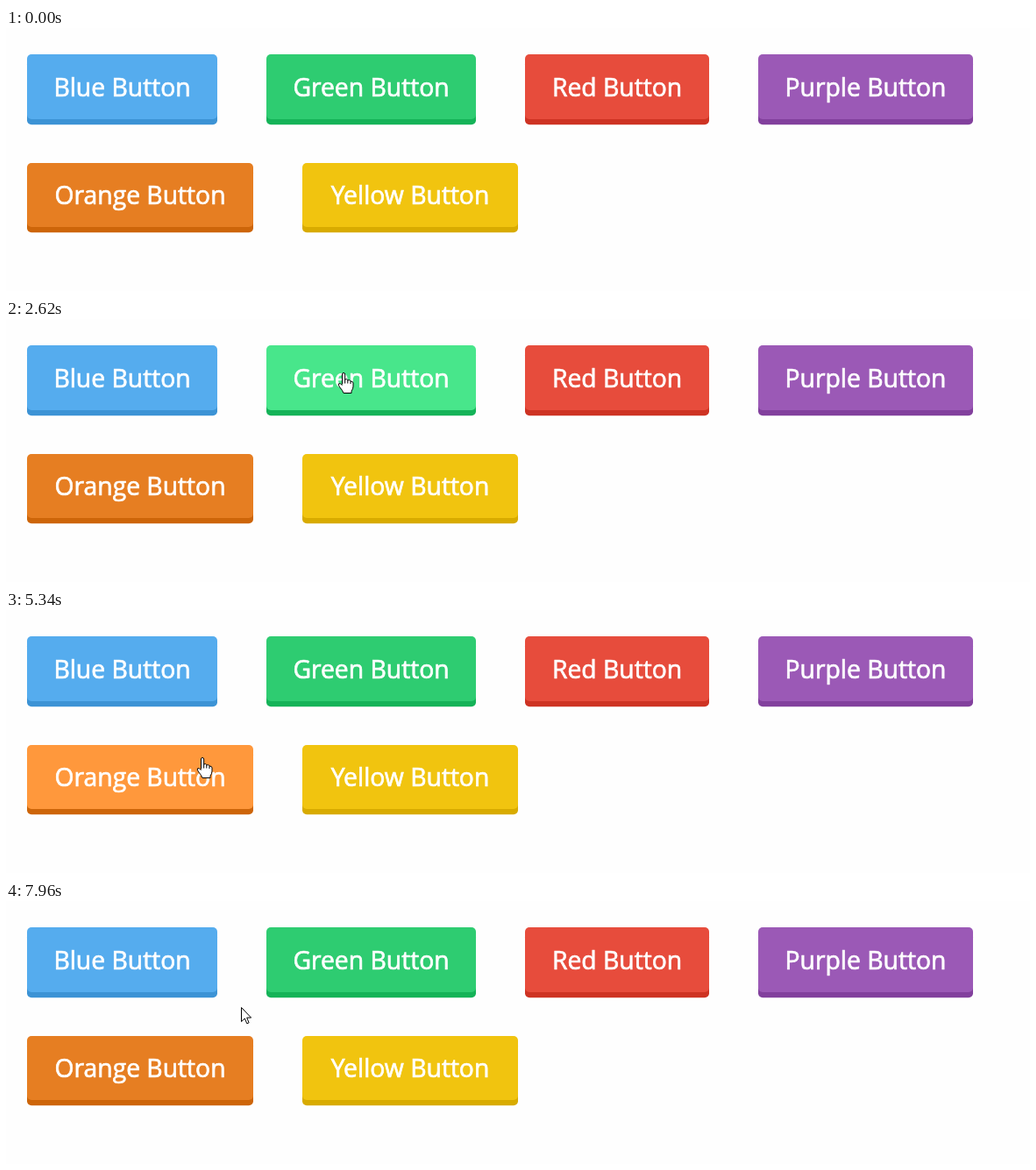
An HTML page that plays this animation: 1168 px wide and 300 px high, repeating every 8000 ms.

```html
<!DOCTYPE html>
<html lang="en">
<head>
<meta charset="utf-8">
<title>Flat buttons</title>
<style>
html, body { margin: 0; width: 100%; height: 100%; overflow: hidden; background: #fefefe; }
svg { display: block; }
text { font: 28.3px "Open Sans", "Noto Sans", sans-serif; fill: #fff; stroke: #fff; stroke-width: .7px; text-anchor: middle; }
#cursor path { fill: #fff; stroke: #000; stroke-linejoin: round; }
</style>
</head>
<body>
<svg width="1168" height="300" viewBox="0 0 1168 300">
  <g id="buttons"></g>
  <g id="cursor">
    <path id="arrow" d="M.5 .5V16.6L4.3 13L6.8 18.8L9.1 17.8L6.7 12.1H11.6Z"/>
    <path id="hand" d="M-1.5 13.5V2Q-1.5 .5 0 .5T1.7 2V8Q3.6 6.9 4.8 8.4V9Q7 8 8 9.6V10.2Q10.8 9.6 11 12V16Q10.8 19 9 21.2V23.5H0Q-1 20.5-4.3 16.8Q-6.7 13.6-5.3 12.7Q-3.8 12-1.5 14.5M1.7 8V12.5M4.8 9V12.5M8 10.2V13"/>
  </g>
</svg>
<script>
const LOOP = 8000, WIDTH = 1168;
const LEFT = 24, TOP = 30, GAP = 56, ROW = 124;
const DEPTH = 6.25, PRESSED_DEPTH = 1.25, SHADE = 25;
const REST = 170; // pause between releasing a button and moving on
const byId = id => document.getElementById(id);

function add(parent, tag, attrs = {}) {
  const node = document.createElementNS('http://www.w3.org/2000/svg', tag);
  for (const key in attrs) node.setAttribute(key, attrs[key]);
  return parent.appendChild(node);
}

function shade(hex, amount) {
  const channels = hex.match(/\w\w/g).map(c => parseInt(c, 16) + amount);
  return `rgb(${channels.map(c => Math.max(0, Math.min(255, c)))})`;
}

// Buttons flow from left to right and wrap at the edge of the stage.
let nextX = LEFT, row = 0;
const buttons = [
  ['Blue', 217, '#55acee'],
  ['Green', 239, '#2ecc71'],
  ['Red', 210, '#e74c3c'],
  ['Purple', 245, '#9b59b6'],
  ['Orange', 258, '#e67e22'],
  ['Yellow', 246, '#f1c40f']
].map(([name, width, color]) => {
  if (nextX + width > WIDTH) {
    nextX = LEFT;
    row++;
  }
  const box = { x: nextX, y: TOP + row * ROW, width, height: 74 - row, rx: 5 };
  nextX += width + GAP;
  const group = add(byId('buttons'), 'g');
  const edge = add(group, 'rect', { ...box, fill: shade(color, -SHADE) });
  const face = add(group, 'rect', box);
  const label = add(group, 'text', { x: box.x + width / 2, y: box.y + box.height - 26 });
  label.textContent = name + ' Button';
  return { box, color, group, edge, face };
});

// Cursor stops: x, y, departure, arrival, press
const entry = [1140, 325];
const stops = [
  [715, 211, 150, 450],
  [165, 66, 680, 1370, 1450],
  [385, 61, 1690, 2320, 2470],
  [695, 71, 2790, 3100, 3170],
  [980, 72, 3950, 4330, 4410],
  [224, 168, 5040, 5340, 5640],
  [428, 176, 6270, 6870, 7040],
  [268, 121, 7730, 7960]
];

function cursorAt(t) {
  let [x, y] = entry;
  for (const [toX, toY, depart, arrive] of stops) {
    const p = Math.max(0, Math.min(1, (t - depart) / (arrive - depart)));
    const ease = Math.sin(p * Math.PI / 2);
    x += (toX - x) * ease;
    y += (toY - y) * ease;
  }
  return [Math.round(x), Math.round(y)];
}

function isPressed(t) {
  return stops.some(([, , , , press], i) => press && t >= press && t < stops[i + 1][2] - REST);
}

function draw(t) {
  const [x, y] = cursorAt(t);
  let over = false;
  for (const { box, color, group, edge, face } of buttons) {
    const hit = x >= box.x && x < box.x + box.width && y >= box.y && y < box.y + box.height;
    const depth = hit && isPressed(t) ? PRESSED_DEPTH : DEPTH;
    over = over || hit;
    face.setAttribute('fill', hit ? shade(color, SHADE + 1) : color);
    edge.setAttribute('y', box.y + depth);
    group.setAttribute('transform', `translate(0 ${depth === DEPTH ? 0 : 6})`);
  }
  byId('cursor').setAttribute('transform', `translate(${x} ${y})`);
  byId('hand').style.display = over ? '' : 'none';
  byId('arrow').style.display = over ? 'none' : '';
}

const began = performance.now();
function tick() {
  draw((performance.now() - began) % LOOP);
  requestAnimationFrame(tick);
}
tick();
</script>
</body>
</html>
```
